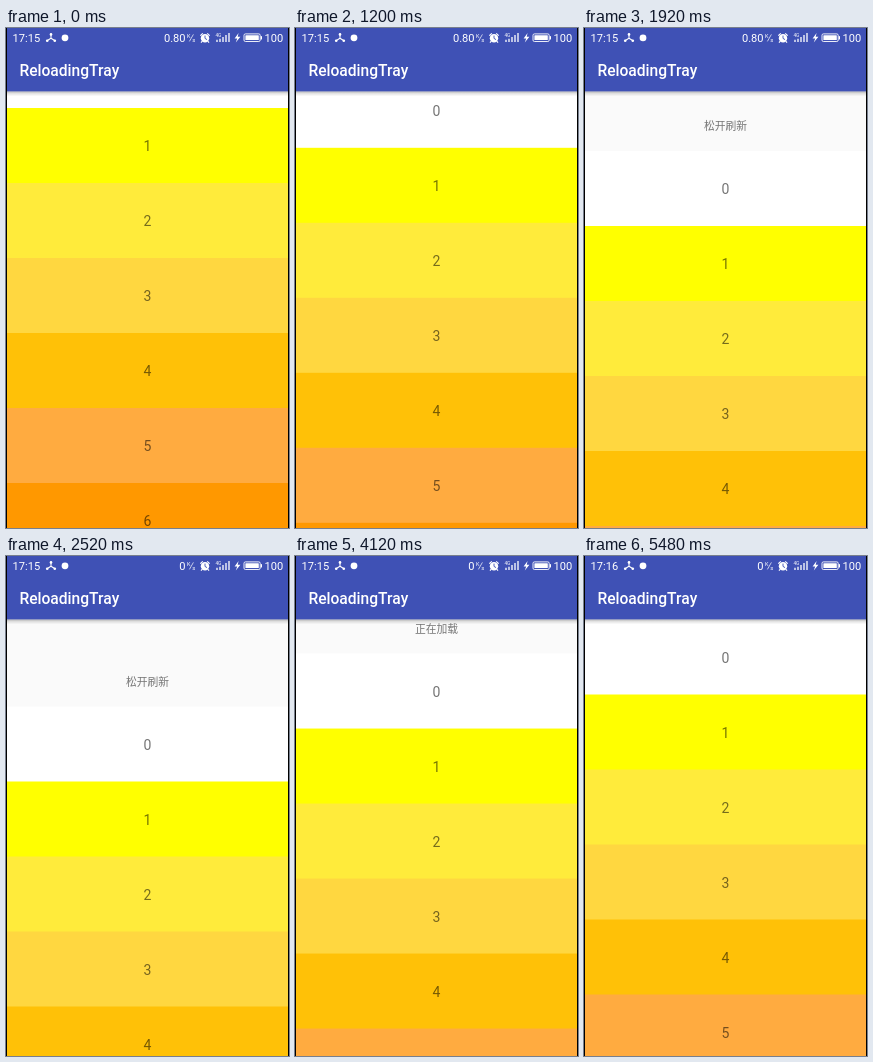
An HTML page that plays this animation: 283x500 px, repeating every 5520 ms.

```html
<!DOCTYPE html>
<html lang="zh-CN">
<head>
<meta charset="utf-8">
<title>Pull to refresh</title>
<style>
  html, body { margin: 0; width: 100%; height: 100%; overflow: hidden; background: #fafafa; }
  svg { display: block; width: 100vw; height: 100vh; }
  text { font-family: Roboto, sans-serif; }
  .row text { font-size: 14px; text-anchor: middle; fill: #000; fill-opacity: .54; }
  #hint { font: 10.8px "Noto Sans CJK SC", "Noto Sans CJK", sans-serif; text-anchor: middle; fill: #757575; }
  #status { fill: #fff; font-size: 11.1px; }
</style>
</head>
<body>
<svg viewBox="0 0 283 500">
  <defs>
    <linearGradient id="shade" x1="0" y1="0" x2="0" y2="1">
      <stop offset="0" stop-color="#000" stop-opacity=".3"/>
      <stop offset=".4" stop-color="#000" stop-opacity=".12"/>
      <stop offset="1" stop-color="#000" stop-opacity="0"/>
    </linearGradient>
  </defs>
  <rect width="283" height="500" fill="#fafafa"/>
  <g id="list">
    <text id="hint" x="141.5" y="-21"></text>
  </g>
  <rect y="63.3" width="283" height="5" fill="url(#shade)"/>
  <rect width="283" height="63.4" fill="#3f51b5"/>
  <text x="13.4" y="47.8" font-size="15.6" font-weight="500" fill="#fff">ReloadingTray</text>
  <g id="status">
    <text id="clock" x="6.6" y="13.6"></text>
    <g stroke="#fff" stroke-width="1.1" fill="none">
      <path d="M45 6.5V10.2L41 12.8M45 10.2L49 12.8"/>
    </g>
    <circle cx="45" cy="6.4" r="1.3"/>
    <circle cx="41.2" cy="12.8" r="1.3"/>
    <circle cx="48.8" cy="12.8" r="1.3"/>
    <circle cx="59" cy="9.8" r="3.4"/>
    <text id="speed" x="179.6" y="13.6" text-anchor="end"></text>
    <text x="181" y="10" font-size="5.5">K</text>
    <path d="M183.4 13.4L187.4 6.4" stroke="#fff" stroke-width=".7"/>
    <text x="186.2" y="13.6" font-size="6">s</text>
    <circle cx="199" cy="10.2" r="4.2"/>
    <path d="M194.3 7.6L196.8 5.4M203.7 7.6L201.2 5.4M196 13.4L195 14.6M202 13.4L203 14.6" stroke="#fff" stroke-width="1.2"/>
    <path d="M199 7.6V10.4L201 11.6" stroke="#3f51b5" stroke-width=".9" fill="none"/>
    <text x="209.4" y="8.8" font-size="4.8">4G</text>
    <path d="M211 14V11.8M214 14V10.8M217 14V9M220 14V7M223 14V5" stroke="#fff" stroke-width="1.3"/>
    <path d="M232.6 5L228.6 10.4H231.2L229.8 14.4L234.4 8.7H231.7Z"/>
    <rect x="238" y="5.9" width="16.2" height="7.6" rx="1.4" fill="none" stroke="#fff" stroke-width=".9"/>
    <rect x="239.4" y="7.3" width="13.4" height="4.8" rx=".4"/>
    <rect x="254.8" y="8" width="1.2" height="3.4" rx=".5"/>
    <text x="258.6" y="13.6">100</text>
  </g>
  <path d="M.5 0V500M282.5 0V500" stroke="#000"/>
</svg>
<script>
const NS = "http://www.w3.org/2000/svg";
const LOOP = 5520, STEP = 40, ROW = 75;
const TOP = 63.5, HOLD = 113.5, PULLED = 167.5;
const RELEASE = 3262, CLOSE = 4082, SETTLE = 330;
const colors = ["#fff", "#ff0", "#ffeb3b", "#ffd740", "#ffc107", "#ffab40", "#ff9800"];

// Finger drag: [time, top of the first row]
const drag = [[960, 5], [1200, 44.8], [1520, 101], [1920, 123],
  [2520, 150.5], [2640, 152.5], [3240, PULLED]];

const el = id => document.getElementById(id);
const list = el("list"), hint = el("hint"), clock = el("clock"), speed = el("speed");

function add(parent, tag, attrs) {
  const node = document.createElementNS(NS, tag);
  for (const key in attrs) node.setAttribute(key, attrs[key]);
  return parent.appendChild(node);
}

colors.forEach((fill, i) => {
  const row = add(list, "g", { class: "row", transform: `translate(0 ${i * ROW})` });
  add(row, "rect", { width: 283, height: ROW + (i < colors.length - 1 ? .5 : 0), fill });
  add(row, "text", { x: 141.5, y: 43 }).textContent = i;
});

// Fast start with an exponential tail
function viscous(p) {
  if (p >= 1) return 1;
  const x = Math.max(0, p) * 8, k = Math.exp(-1);
  return x < 1 ? x - 1 + Math.exp(-x) : k + (1 - k) * (1 - Math.exp(1 - x));
}

const mix = (a, b, p) => a + (b - a) * p;

function dragAt(t) {
  if (t <= drag[0][0]) return drag[0][1];
  const i = drag.findIndex(k => k[0] >= t);
  if (i < 0) return PULLED;
  const [t0, y0] = drag[i - 1], [t1, y1] = drag[i];
  return mix(y0, y1, (t - t0) / (t1 - t0));
}

function offsetAt(t) {
  if (t >= CLOSE) return mix(HOLD, TOP, viscous((t - CLOSE) / SETTLE));
  if (t >= RELEASE) return mix(PULLED, HOLD, viscous((t - RELEASE) / SETTLE));
  return dragAt(t);
}

function draw(time) {
  const t = Math.floor(time % LOOP / STEP) * STEP;
  const y = offsetAt(t);
  list.setAttribute("transform", `translate(0 ${y.toFixed(2)})`);
  hint.textContent = t >= RELEASE ? "正在加载" : y > HOLD ? "松开刷新" : "下拉刷新";
  clock.textContent = t < 5480 ? "17:15" : "17:16";
  speed.textContent = t < 2320 ? "0.80" : "0";
}

const start = performance.now();
function tick() {
  draw(performance.now() - start);
  requestAnimationFrame(tick);
}
tick();
</script>
</body>
</html>
```
